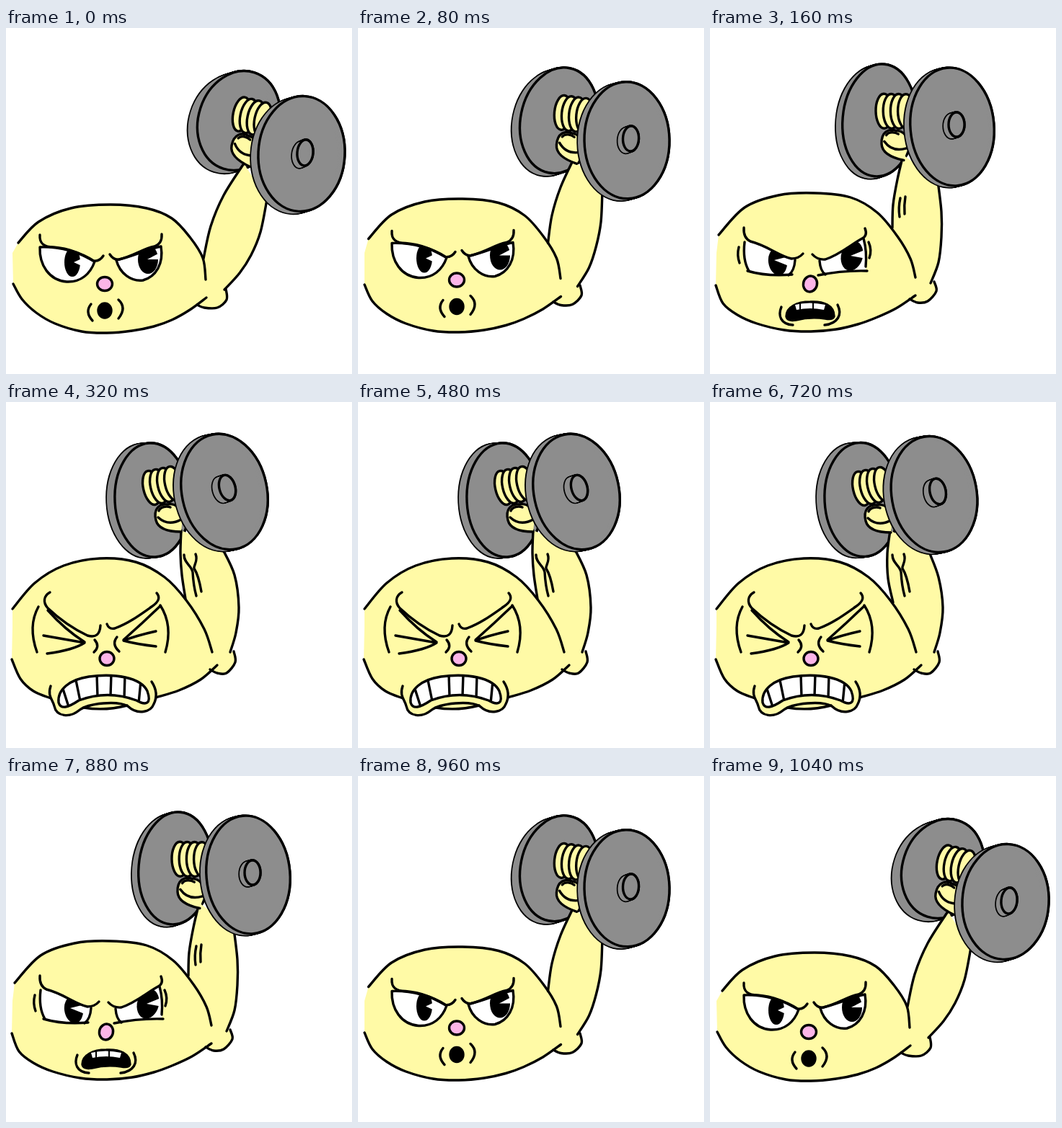
Recreate the animation shown at these times as an HTML page with a canvas. Size 480 by 480 pixels, loop 1.12 s.

```html
<!DOCTYPE html>
<html lang="en">
<head>
<meta charset="utf-8">
<title>Dumbbell curl</title>
<style>
  html, body { margin: 0; width: 100%; height: 100%; overflow: hidden; background: #fff; }
  canvas { display: block; width: 480px; height: 480px; }
</style>
</head>
<body>
<canvas id="stage" width="480" height="480"></canvas>
<script>
const ctx = document.getElementById('stage').getContext('2d');
const SKIN = '#fffaa6', STEEL = '#8d8d8d', PINK = '#fcb5e8', INK = '#000';

// Each pose: outline points, then discs as x y rx ry angle and depth offset, fist as x y angle
const tight = {
  top: '9 287 40 251 80 227 130 217 180 222 220 243 250 275 275 315 286 347',
  base: '8 357 20 384 38 401 62 411 110 424 140 426 170 420 208 410 240 400 270 385 293 365',
  inner: '249 273 244 240 242 210 243 178',
  outer: '300 203 317 240 323 285 319 320 311 347',
  elbow: '316 346 318 361 306 376 293 376 283 371',
  back: '203 136 52 79 -3 -11 1',
  front: '303 124.5 59 81 -12 -10 2',
  hub: '307 119 11 18 -15 -9 3',
  fist: '215 120 0'
};
const poses = [
  {
    top: '17 298 45 269 90 250 145 245 195 250 230 264 255 290 273 319 277 349',
    base: '10 355 22 376 42 395 68 410 105 421 140 423 175 420 205 414 230 405 255 391 278 374',
    inner: '274 320 284 275 302 232 330 188',
    outer: '362 238 353 283 340 315 324 340 303 363',
    elbow: '305 362 306 377 293 388 275 388 265 384',
    back: '323 128.5 56 70 18 -13 4',
    front: '410 174.5 60 80 3 -10 3',
    hub: '415 173 11 18 5 -7 3',
    fist: '338 126 25'
  },
  {
    top: '12 287 48 249 95 232 145 229 195 235 232 256 260 289 278 320 285 346',
    base: '8 357 18 382 38 398 65 410 103 419 140 421 175 418 205 411 230 402 258 389 285 371',
    inner: '253 277 254 245 260 210 268 176',
    outer: '316 212 321 255 321 290 317 325 306 354',
    elbow: '311 352 314 365 302 379 288 381 277 376',
    back: '235 128 51 78 5 -9 3',
    front: '336 137 58 82 -5 -8 2',
    hub: '342 134 11 17 0 -7 2',
    fist: '254 119 12'
  },
  tight,
  {
    ...tight,
    inner: '254 278 247 245 246 210 250 178',
    outer: '304 208 317 243 323 285 319 320 311 347',
    back: '211 135.5 52 79 -3 -11 1',
    front: '311 128 59 81 -10 -10 2',
    hub: '316 124 11 18 -12 -8 3',
    fist: '223 121 0'
  }
].map(pose => Object.fromEntries(
  Object.entries(pose).map(([key, text]) => [key, text.split(' ').map(Number)])));

const STEP = 80;
const beats = [0, .5, 1, 1.5, 2, 3, 2, 3, 2, 3, 1.5, 1, .5, 0];

function poseAt(p) {
  const a = poses[Math.floor(p)], b = poses[Math.ceil(p)], t = p % 1, mixed = {};
  for (const key in a) mixed[key] = a[key].map((v, i) => v + (b[key][i] - v) * t);
  return mixed;
}

// Smooth curve through flat x,y points
function curve(pts, path = new Path2D(), join = false) {
  const last = pts.length / 2 - 1;
  const at = i => { i = Math.max(0, Math.min(last, i)); return [pts[2 * i], pts[2 * i + 1]]; };
  path[join ? 'lineTo' : 'moveTo'](...at(0));
  for (let i = 0; i < last; i++) {
    const [o, a, b, c] = [at(i - 1), at(i), at(i + 1), at(i + 2)];
    path.bezierCurveTo(a[0] + (b[0] - o[0]) / 6, a[1] + (b[1] - o[1]) / 6,
      b[0] - (c[0] - a[0]) / 6, b[1] - (c[1] - a[1]) / 6, ...b);
  }
  return path;
}

function flip(pts) {
  const out = [];
  for (let i = pts.length - 2; i >= 0; i -= 2) out.push(pts[i], pts[i + 1]);
  return out;
}

function oval(x, y, rx, ry, angle = 0) {
  const path = new Path2D();
  path.ellipse(x, y, rx, ry, angle * Math.PI / 180, 0, 7);
  return path;
}

function paint(path, fill, outline = true) {
  if (typeof path === 'string') path = new Path2D(path);
  if (fill) { ctx.fillStyle = fill; ctx.fill(path); }
  if (outline) ctx.stroke(path);
}

function disc([x, y, rx, ry, angle, dx, dy]) {
  const layers = [];
  for (let k = 0; k <= 1; k += .125) layers.push(oval(x + dx * k, y + dy * k, rx, ry, angle));
  layers.forEach(layer => paint(layer));
  layers.forEach(layer => paint(layer, STEEL, false));
  paint(layers[0]);
}

function fist([x, y, angle]) {
  ctx.save();
  ctx.translate(x, y);
  ctx.rotate(angle * Math.PI / 180);
  for (let i = 0; i < 4; i++) paint(oval(-13 + 10 * i, -1 - 2 * i, 11.5, 24, -13), SKIN);
  paint('M28 60C10 60-4 56-7 44C-11 28-2 21 9 22C20 20 28 28 30 40Z', SKIN, false);
  paint('M28 60C10 60-4 56-7 44C-11 28-2 21 9 22C20 20 27 27 29 38');
  paint('M-3 31C-1 25 8 24 13 26M-4 40Q10 53 28 43');
  ctx.restore();
}

function eye(shape, pupil, notch, outline) {
  ctx.save();
  paint(shape, '#fff', false);
  ctx.clip(new Path2D(shape));
  paint(oval(...pupil), INK, false);
  paint(notch, '#fff', false);
  ctx.restore();
  if (outline) paint(shape);
}

const faces = [
  function calm() {
    eye('M47 304C75 303 104 311 123 324C117 341 104 353 84 352C60 350 46 329 47 304Z',
      [92, 325, 11, 20], 'M107 319L94 325L107 331Z', true);
    eye('M153 322C176 317 195 307 215 303C219 327 208 345 190 350C174 352 158 341 153 322Z',
      [197, 321, 14, 20], 'M213 312L196 321L213 321Z', true);
    paint('M47 287C46 299 53 304 66 304C92 306 108 316 121 323Q130 324 135 316');
    paint('M144 314Q149 322 157 321C178 316 190 306 206 303Q217 299 216 286');
    paint(oval(137, 355, 10.5, 9.5), PINK);
    paint(oval(137, 392, 9, 10), INK);
    paint('M118 383Q109 394 120 406M156 377Q168 388 156 403');
  },
  function strained() {
    eye('M50 296C73 301 95 314 118 321Q118 335 109 343Q78 344 55 337Q44 319 50 296Z',
      [94, 324, 13, 19, -8], 'M109 317L89 322L109 330Z');
    eye('M152 322C175 317 196 302 213 292Q219 317 216 335Q188 336 160 342Q153 335 152 322Z',
      [197, 316, 15, 21, 15], 'M217 307L195 316L217 320Z');
    paint('M48 297Q45 322 54 337M118 322Q117 337 109 343M152 323Q153 337 160 342M213 292Q218 310 216 331');
    paint('M52 337Q79 345 114 342M150 343Q184 336 218 337');
    paint('M47 277Q46 291 56 296C80 302 95 316 113 320Q123 320 129 313');
    paint('M142 314Q149 322 160 321C181 314 196 300 211 292Q219 288 215 278');
    paint('M40 304Q37 315 41 326M220 297Q225 308 221 319');
    paint(oval(139, 355, 9.5, 11, 15), PINK);
    paint('M106 400C106 387 121 380 139 380C158 379 172 385 172 400Q170 405 160 403Q139 400 119 405Q107 407 106 400Z', INK);
    paint('M118 384Q138 379 160 384L158 391Q139 387 120 391Z', '#fff', false);
    ctx.lineWidth = 2;
    paint('M125 382V391M143 381V390');
    ctx.lineWidth = 3.4;
    paint('M99 387C94 399 98 411 115 412M177 384C184 398 177 410 159 412');
  },
  function clenched() {
    paint('M61 264C52 269 51 278 58 286C76 303 94 315 113 324Q130 329 131 310');
    paint('M140 308Q143 316 151 314C170 307 185 296 202 284Q217 274 209 265');
    paint('M58 289Q82 316 109 333M52 324Q80 329 109 334Q94 344 57 349');
    paint('M214 283Q188 308 163 330M208 318Q181 324 163 331Q181 336 208 339');
    paint('M45 284Q30 311 43 347M214 282Q232 310 221 347');
    paint('M123 330Q131 339 122 347M154 326Q146 336 157 346');
    paint(oval(140, 356, 10, 9.5), PINK);
    const lips = 'M62 394C57 408 65 413 67 422C70 437 89 438 101 428Q111 420 135 418Q158 416 169 422C183 435 201 430 205 419C211 407 208 397 202 388';
    paint(lips, SKIN, false);
    paint(lips);
    paint('M108 424Q137 429 168 421');
    const mouth = 'M73 417C71 399 88 385 115 381C151 376 187 382 196 401C202 418 195 422 181 414Q141 399 101 414C86 424 76 427 73 417Z';
    paint(mouth, '#fff');
    ctx.save();
    ctx.clip(new Path2D(mouth));
    paint('M79 398L87 423M97 386L103 415M126 378L127 409M146 377L145 408M165 379L164 411M187 387L184 418');
    ctx.restore();
  }
];

function armMarks(p) {
  ctx.save();
  if (p >= 2) {
    ctx.translate((p - 2) * 6, 0);
    paint('M247 212C247 224 257 226 259 236Q260 255 264 269M263 211C267 221 260 226 261 231Q267 240 271 263');
  } else if (p >= 1) {
    ctx.translate((1 - p) * 12, 0);
    paint('M264 236Q261 249 263 262M271 234Q269 246 270 258');
  }
  ctx.restore();
}

function draw(p) {
  const pose = poseAt(p);
  ctx.fillStyle = '#fff';
  ctx.fillRect(0, 0, 480, 480);
  ctx.lineWidth = 3.4;
  ctx.lineCap = ctx.lineJoin = 'round';
  ctx.strokeStyle = INK;

  disc(pose.back);
  const arm = curve(pose.inner);
  curve(pose.outer, arm, true);
  curve(pose.elbow, arm, true);
  paint(arm, SKIN, false);
  const head = curve(pose.top);
  curve(flip(pose.base), head, true);
  head.lineTo(9, 312);
  paint(head, SKIN, false);
  for (const part of ['top', 'inner', 'outer', 'elbow']) paint(curve(pose[part]));
  // The lips interrupt the chin line when the teeth are clenched
  if (p < 2) paint(curve(pose.base));
  else {
    paint(curve(pose.base.slice(0, 8)));
    paint(curve(pose.base.slice(14)));
  }
  armMarks(p);

  ctx.save();
  ctx.translate(0, p < 2 ? -(p % 1) * 11 : 0);
  faces[Math.min(2, Math.floor(p))]();
  ctx.restore();

  fist(pose.fist);
  disc(pose.front);
  disc(pose.hub);
}

const start = performance.now();
function tick() {
  const time = performance.now() - start;
  draw(beats[Math.floor(time / STEP) % beats.length]);
  requestAnimationFrame(tick);
}
tick();
</script>
</body>
</html>
```
